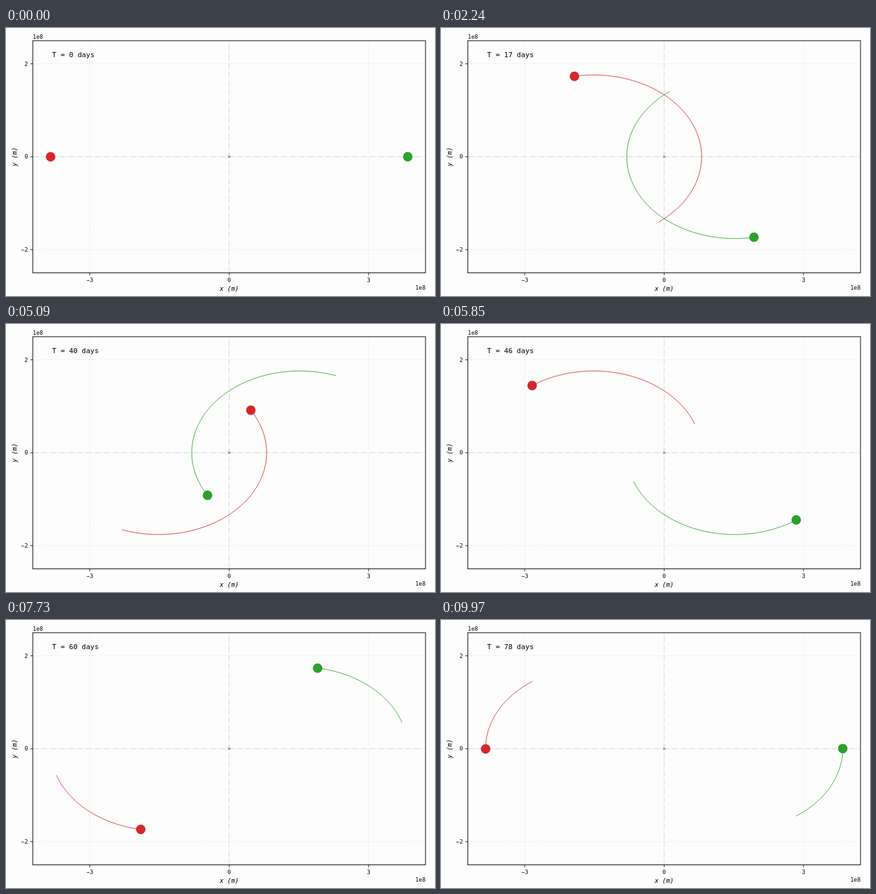
Animation of 677x423 px, one loop 10000 ms. Source, as an HTML page with a canvas:

```html
<!DOCTYPE html>
<html lang="en">
<head>
<meta charset="utf-8">
<title>Two-body orbit</title>
<style>
  html, body { margin: 0; width: 100%; height: 100%; overflow: hidden; background: #fefdfe; }
  canvas { display: block; width: 677px; height: 423px; }
</style>
</head>
<body>
<canvas id="stage" width="677" height="423"></canvas>
<script>
const ctx = document.getElementById('stage').getContext('2d');
const LOOP = 10000, STEPS = 330;
const CX = 352.2, CY = 203.2, UNIT = 73.32;
const BOX = { left: 42.3, top: 20, right: 662, bottom: 386.4 };
const RED = '#d62728', GREEN = '#2ca02c', BLUE = '#1f77b4';

// Both bodies follow mirrored Kepler ellipses, starting at apoapsis.
const APO = 281.8, PERI = 59.1;
const SEMI = (APO + PERI) / 2, ECC = (APO - PERI) / (APO + PERI);
const MINOR = SEMI * Math.sqrt(1 - ECC * ECC);
const PERIOD = 109.7, PHASE = 0.17, TRAIL = 26.35, DAYS_PER_STEP = 0.236;

function orbit(step) {
  const mean = 2 * Math.PI * step / PERIOD;
  let angle = mean;
  for (let i = 0; i < 12; i++) {
    angle -= (angle + ECC * Math.sin(angle) - mean) / (1 + ECC * Math.cos(angle));
  }
  return [SEMI * (Math.cos(angle) + ECC), -MINOR * Math.sin(angle)];
}

function line(x1, y1, x2, y2, color, width, dash = []) {
  ctx.strokeStyle = color;
  ctx.lineWidth = width;
  ctx.setLineDash(dash);
  ctx.beginPath();
  ctx.moveTo(x1, y1);
  ctx.lineTo(x2, y2);
  ctx.stroke();
  ctx.setLineDash([]);
}

function label(text, x, y, size = 8.89, align = 'left', style = '') {
  ctx.font = `${style} ${size}px "DejaVu Sans Mono", monospace`;
  ctx.textAlign = align;
  ctx.fillStyle = '#000';
  ctx.fillText(text, x, y);
}

function drawGrid() {
  const { left, top, right, bottom } = BOX;
  for (const n of [-3, 0, 3]) line(CX + n * UNIT, bottom, CX + n * UNIT, top, '#d8d8d8', 0.8, [0.9, 1.4]);
  for (const n of [-2, 0, 2]) line(left, CY - n * UNIT, right, CY - n * UNIT, '#d8d8d8', 0.8, [0.9, 1.4]);
  line(left, CY, right, CY, '#cfcfcf', 0.8, [9, 5]);
  line(CX, bottom, CX, top, '#cfcfcf', 0.8, [9, 5]);
  line(CX - 1.8, CY - 1.8, CX + 1.8, CY + 1.8, BLUE, 1);
  line(CX - 1.8, CY + 1.8, CX + 1.8, CY - 1.8, BLUE, 1);
}

function drawAxes() {
  const { left, top, right, bottom } = BOX;
  for (const n of [-3, 0, 3]) {
    const x = CX + n * UNIT;
    line(x, bottom, x, bottom + 3.9, '#000', 0.9);
    label(String(n).replace('-', '−'), x, 401.4, 8.89, 'center');
  }
  for (const n of [-2, 0, 2]) {
    const y = CY - n * UNIT;
    line(left - 3.9, y, left, y, '#000', 0.9);
    label(String(n).replace('-', '−'), 34.5, y + 3.2, 8.89, 'right');
  }
  ctx.strokeStyle = '#000';
  ctx.lineWidth = 1;
  ctx.strokeRect(left, top, right - left, bottom - top);

  label('1e8', left, 16.6);
  label('1e8', right, 413.4, 8.89, 'right');
  label('x (m)', CX, 415, 10, 'center', 'italic');
  ctx.save();
  ctx.translate(17, CY);
  ctx.rotate(-Math.PI / 2);
  label('y (m)', 0, 0, 10, 'center', 'italic');
  ctx.restore();
}

function drawBody(now, sign, color) {
  const start = Math.max(0, now - TRAIL);
  ctx.strokeStyle = color;
  ctx.lineWidth = 0.9;
  ctx.beginPath();
  for (let i = 0; i <= 80; i++) {
    const [x, y] = orbit(start + (now - start) * i / 80);
    ctx.lineTo(CX + sign * x, CY + sign * y);
  }
  ctx.stroke();
  const [x, y] = orbit(now);
  ctx.fillStyle = color;
  ctx.beginPath();
  ctx.arc(CX + sign * x, CY + sign * y, 7.5, 0, 2 * Math.PI);
  ctx.fill();
}

function render(ms) {
  const time = ms % LOOP;
  // Steps begin on whole hundredths of a second; 4.9 ms covers the rounding.
  const step = Math.min(STEPS - 1, Math.floor((time + 4.9) * STEPS / LOOP));
  const now = step ? step + PHASE : 0;
  ctx.fillStyle = '#fefdfe';
  ctx.fillRect(0, 0, 677, 423);
  drawGrid();
  drawBody(now, -1, RED);
  drawBody(now, 1, GREEN);
  drawAxes();
  label(`T = ${Math.round(step * DAYS_PER_STEP)} days`, 72.8, 45.6, 11.11);
}

let origin;
function tick(stamp) {
  origin ??= stamp;
  render(stamp - origin);
  requestAnimationFrame(tick);
}
render(0);
requestAnimationFrame(tick);
</script>
</body>
</html>
```
